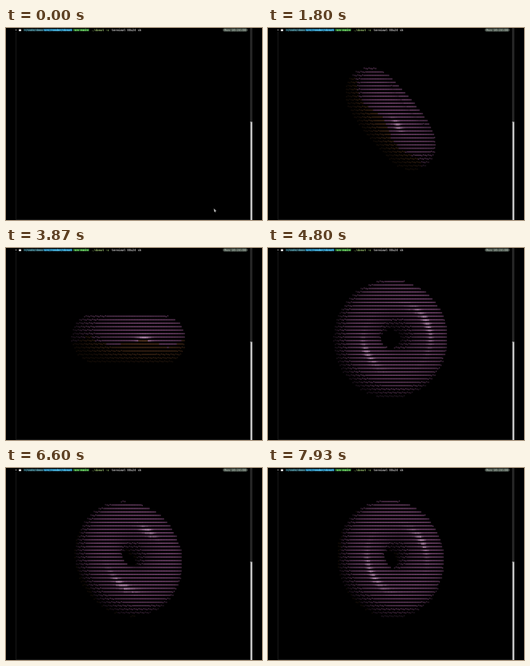
An HTML page with a canvas for the animation above (8000 ms loop, 320x240 px).

```html
<!DOCTYPE html>
<html lang="en">
<head>
<meta charset="utf-8">
<title>Terminal donut</title>
<style>
  html, body { margin: 0; width: 100%; height: 100%; overflow: hidden; background: #000; }
  canvas { display: block; width: 320px; height: 240px; }
</style>
</head>
<body>
<canvas width="320" height="240"></canvas>
<script>
const ctx = document.querySelector('canvas').getContext('2d');
const LOOP = 8000, STEP = 1000 / 15, START = 930;
const COLS = 84, ROWS = 40, CELL = 2, PITCH = 4.34;
const LEFT = 69.5, TOP = 33.2, CX = 153.3, CY = 113.5;
const RING = 42.5, TUBE = 28.5;
const RAD = Math.PI / 180;

// [ms, tumble in degrees, roll around the viewing axis in degrees]
const POSES = [
  [0, -297, -394], [1800, -110, -211], [3000, 4, -89], [4800, 184, 94],
  [5730, 299, 188], [6600, 383, 264], [8000, 534, 339],
];

const depth = new Float32Array(COLS * ROWS);
const light = new Float32Array(COLS * ROWS);
const shine = new Float32Array(COLS * ROWS);
const iced = new Uint8Array(COLS * ROWS);

function poseAt(t) {
  const i = POSES.findIndex(([time]) => time > t);
  const from = POSES[i - 1], to = POSES[i];
  const k = (t - from[0]) / (to[0] - from[0]);
  return [1, 2].map(n => (from[n] + (to[n] - from[n]) * k) * RAD);
}

function rotation(t) {
  const [tumble, roll] = poseAt(t);
  const s = Math.sin(tumble), c = Math.cos(tumble);
  const sr = Math.sin(roll), cr = Math.cos(roll);
  return (x, y, z) => {
    const y1 = y * c + z * s, z1 = z * c - y * s;
    const x1 = x * c - z1 * s;
    return [x1 * cr - y1 * sr, x1 * sr + y1 * cr, x * s + z1 * c];
  };
}

function traceDonut(t) {
  const rotate = rotation(t);
  depth.fill(-1e3);
  for (let a = 0; a < 360; a += 1.2) {
    const ca = Math.cos(a * RAD), sa = Math.sin(a * RAD);
    const edge = -0.12 + 0.14 * Math.sin(6 * a * RAD);
    for (let b = 0; b < 360; b += 3) {
      const cb = Math.cos(b * RAD), sb = Math.sin(b * RAD);
      const [nx, ny, nz] = rotate(ca * cb, sa * cb, sb);
      if (nz < 0) continue;
      const [rx, ry, rz] = rotate(ca * RING, sa * RING, 0);
      const x = rx + nx * TUBE, y = ry + ny * TUBE, z = rz + nz * TUBE;
      const col = Math.floor((CX + x * 0.985 - LEFT) / CELL);
      const row = Math.round((CY - y * 1.01 - TOP) / PITCH);
      const i = row * COLS + col;
      if (z <= depth[i]) continue;
      depth[i] = z;
      light[i] = Math.max(0, 0.38 * nx + 0.33 * ny + 0.86 * nz);
      shine[i] = Math.max(0, 0.27 * nx + 0.04 * ny + 0.962 * nz) ** 130;
      iced[i] = sb > edge ? 1 : 0;
    }
  }
}

function drawDonut(t) {
  traceDonut(t);
  for (let row = 0; row < ROWS; row++) {
    for (let col = 0; col < COLS; col++) {
      const i = row * COLS + col;
      if (depth[i] < -999) continue;
      const base = iced[i] ? [122, 72, 116] : [82, 50, 28];
      const level = 0.22 + 0.72 * light[i];
      const glint = iced[i] ? 75 * shine[i] : 0;
      const [r, g, b] = base.map(v => Math.round(v * level + glint));
      // Dim cells hold small punctuation, brighter ones merge into lines
      const ragged = light[i] < 0.55 ? (col * 7 + row * 5) % 3 - 1 : 0;
      ctx.fillStyle = `rgb(${r},${g},${b})`;
      ctx.fillRect(LEFT + col * CELL, TOP + row * PITCH - 0.8 + ragged * 0.5,
        ragged ? 1.5 : CELL, 1.7 + 0.8 * shine[i]);
    }
  }
}

function label(text, x, width, color) {
  ctx.fillStyle = color;
  ctx.fillText(text, x, 3.8, width);
}

function drawWindow() {
  ctx.fillStyle = '#000';
  ctx.fillRect(0, 0, 320, 240);
  ctx.fillStyle = '#161616';
  ctx.fillRect(12, 5, 1, 235);
  ctx.fillRect(12, 239, 293, 1);
  ctx.fillStyle = '#242424';
  ctx.fillRect(305, 0, 3, 118);
  ctx.fillStyle = '#888';
  ctx.fillRect(305, 117, 3, 1);
  ctx.fillStyle = '#c8c8c8';
  ctx.fillRect(305.5, 118, 2.4, 122);

  ctx.fillStyle = '#ddd';
  ctx.fillRect(12, 2, 1, 1);
  ctx.fillRect(16, 1.5, 3, 2.5);
  ctx.fillStyle = '#1c424c';
  ctx.fillRect(22, 1, 25, 3);
  ctx.fillStyle = '#1c6a90';
  ctx.fillRect(47, 1, 36, 3);
  ctx.fillStyle = '#286a2c';
  ctx.fillRect(84, 1, 20, 3);
  ctx.fillStyle = '#4a544c';
  ctx.beginPath();
  ctx.roundRect(271, 0.5, 31, 4, 2);
  ctx.fill();

  ctx.font = 'bold 4px "DejaVu Sans Mono", monospace';
  label('~/code/demo', 23, 23, '#5fa0ae');
  label('src/render/donut', 48, 34, '#5cccf4');
  label('on main', 86, 17, '#7ce070');
  label('./donut -c', 107, 22, '#9cc470');
  label('terminal 80x24 sh', 132, 37, '#bbb');
  label('Mon 10:24:00', 273, 27, '#96a49a');
}

function drawPointer(t) {
  ctx.globalAlpha = Math.max(0, Math.min(1, (400 - t) / 330));
  ctx.fillStyle = '#aaa';
  ctx.beginPath();
  ctx.moveTo(259.7, 225.5);
  ctx.lineTo(263, 228.5);
  ctx.lineTo(261.7, 229);
  ctx.lineTo(262.3, 230.3);
  ctx.lineTo(261.2, 230.3);
  ctx.lineTo(260, 229);
  ctx.fill();
  ctx.globalAlpha = 1;
}

function frame(now) {
  const t = Math.floor((now % LOOP + 1) / STEP) * STEP % LOOP;
  drawWindow();
  drawPointer(t);
  if (t >= START) drawDonut(t);
  requestAnimationFrame(frame);
}
requestAnimationFrame(frame);
</script>
</body>
</html>
```
